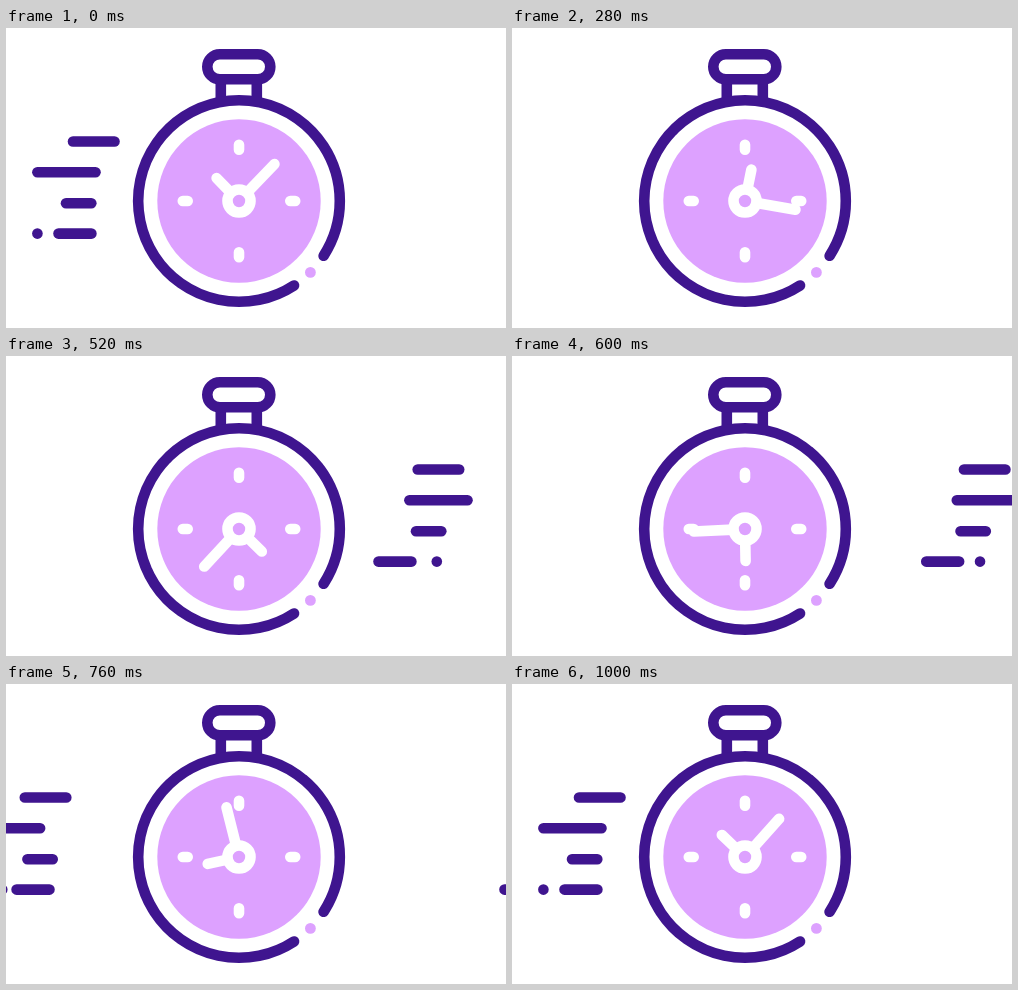
Recreate the animation shown at these times as an HTML page. Size 500 px wide and 300 px high, loop 1040 ms.

```html
<!DOCTYPE html>
<html lang="en">
<head>
<meta charset="utf-8">
<title>Stopwatch</title>
<style>
  html, body { margin: 0; width: 100%; height: 100%; overflow: hidden; background: #fff; }
  svg { display: block; width: 100vw; height: 100vh; }
  .dark { stroke: #3f158f; }
  .white { stroke: #fff; }
  .dark, .white { fill: none; stroke-width: 10.6; stroke-linecap: round; }
  .pink { fill: #dda1ff; }
</style>
</head>
<body>
<svg viewBox="0 0 500 300">
  <g id="streaks" class="dark"></g>
  <circle cx="233" cy="173" r="114.8" fill="#fff"/>
  <g class="dark">
    <path d="M214.8 54V70M250.8 54V70" stroke-linecap="butt"/>
    <rect x="201.3" y="26.2" width="63" height="25.1" rx="12.55"/>
    <circle r="100.8" pathLength="360" stroke-dasharray="336 24" transform="translate(233 173) rotate(56.9)"/>
  </g>
  <circle class="pink" cx="304.4" cy="244.4" r="5.4"/>
  <g transform="translate(233 173)">
    <circle class="pink" r="81.7"/>
    <path class="white" d="M0-56.2V-51.3M0 51.3V56.2M-56.2 0H-51.3M51.3 0H56.2"/>
    <g id="hands" class="white">
      <path d="M0-12V-51.2" transform="rotate(43.8)"/>
      <path d="M0-12V-32" transform="rotate(-44.4)"/>
    </g>
    <circle class="white" r="11.5"/>
  </g>
</svg>
<script>
const LOOP = 1040, STEP = 40;
const outTimes = [0, 120, 520, 680, 840];
const inTimes = [520, 680, 840, 1000];

// x1, x2: cap centres at rest; out: offsets leaving to the right; back: offsets returning from the left
const streaks = [
  { y: 113.5, x1: 67, x2: 108.5, out: [0, 81, 344.7, 422, 490], back: [-155, -77.5, -25.4, 0] },
  { y: 144.2, x1: 31.4, x2: 89.5, out: [0, 86, 372, 451, 520], back: [-167, -88, -29, 0] },
  { y: 175.2, x1: 60, x2: 85.3, out: [0, 81, 350, 423.7, 490], back: [-136, -63, -20.7, 0] },
  { y: 205.6, x1: 52.5, x2: 85.4, out: [0, 74, 320, 401, 472], back: [-150, -69, -22.2, 0] },
  { y: 205.6, x1: 31.4, x2: 31.41, out: [0, 92, 399.4, 469.5, 535], back: [-131, -60, -17, 0] }
];

const group = document.getElementById('streaks');
const hands = document.getElementById('hands');
for (const s of streaks) {
  s.path = document.createElementNS('http://www.w3.org/2000/svg', 'path');
  group.append(s.path);
}

function slope(times, v, i) {
  if (i === times.length - 1) return 0;
  const b = times[i + 1] - times[i], after = (v[i + 1] - v[i]) / b;
  if (i === 0) return after;
  const a = times[i] - times[i - 1], before = (v[i] - v[i - 1]) / a;
  return (before * b + after * a) / (a + b);
}

// Smooth cubic curve through the values, held at both ends
function curve(times, v, t) {
  const last = times.length - 1;
  if (t <= times[0]) return v[0];
  if (t >= times[last]) return v[last];
  let i = 0;
  while (t >= times[i + 1]) i++;
  const h = times[i + 1] - times[i], u = (t - times[i]) / h, w = 1 - u;
  return v[i] * w * w * (1 + 2 * u) + v[i + 1] * u * u * (3 - 2 * u)
    + h * u * w * (slope(times, v, i) * w - slope(times, v, i + 1) * u);
}

function draw(t) {
  for (const { path, y, x1, x2, out, back } of streaks) {
    const offsets = [curve(outTimes, out, t)];
    if (t > inTimes[0]) offsets.push(curve(inTimes, back, t));
    path.setAttribute('d', offsets.map(d => `M${x1 + d} ${y}H${x2 + d}`).join(''));
  }
  const s = Math.min(1, Math.max(0, (t - 40) / 960));
  hands.setAttribute('transform', `rotate(${358 * s * s * (3 - 2 * s)})`);
}

const start = performance.now();
function tick() {
  const t = (performance.now() - start) % LOOP;
  draw(Math.floor(t / STEP) * STEP);
  requestAnimationFrame(tick);
}
tick();
</script>
</body>
</html>
```
